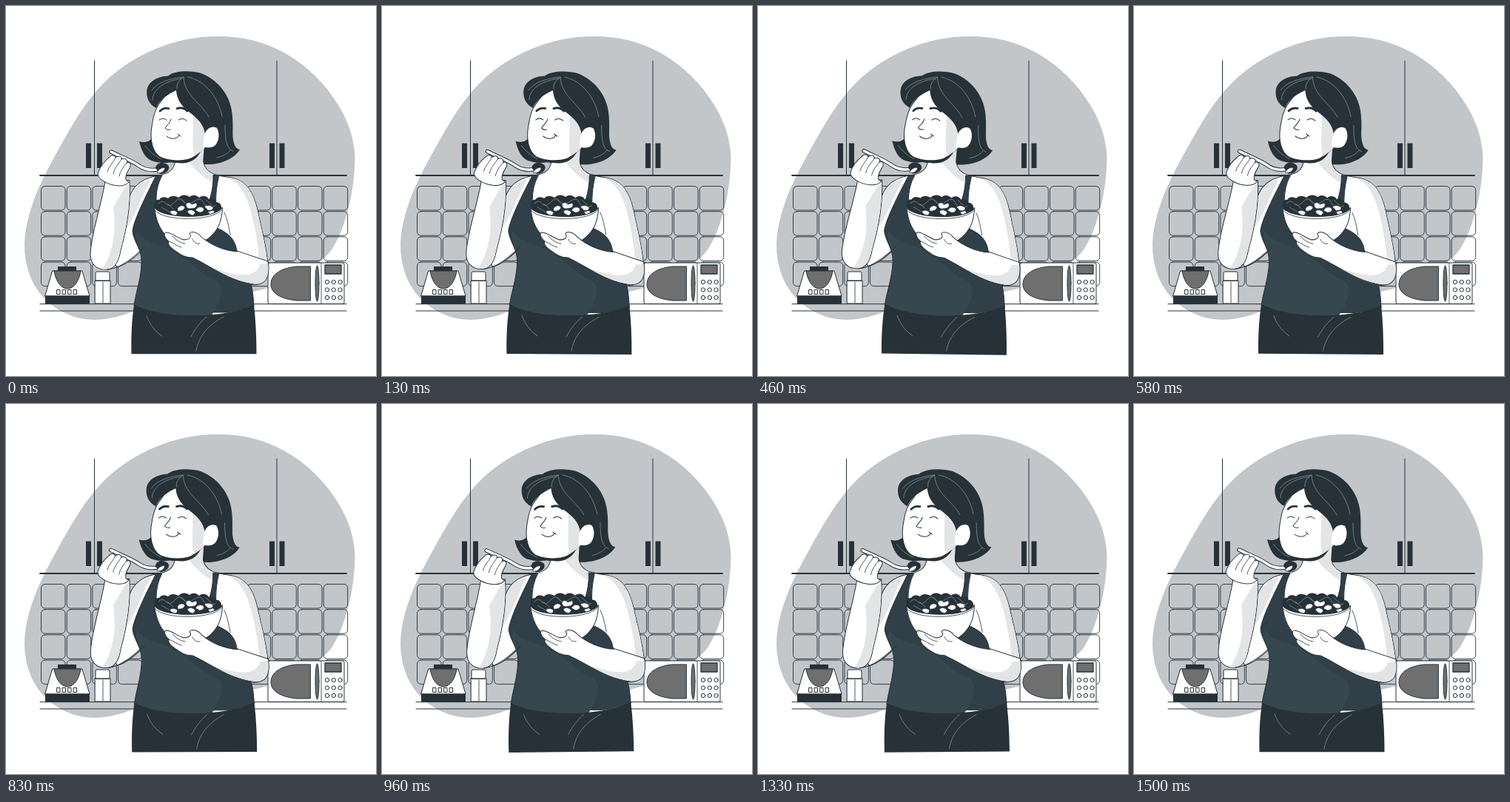
Write an HTML page that moves like this. It is 500 px wide and 500 px high and loops after 1540 ms.

```html
<!DOCTYPE html>
<html lang="en">
<head>
<meta charset="utf-8">
<title>Healthy meal</title>
<style>
html, body { margin: 0; height: 100%; overflow: hidden; background: #fff }
svg { display: block; width: 100vw; height: 100vh; stroke-linecap: round; stroke-linejoin: round }
.line { fill: none; stroke: #263238 }
.skin { fill: #fff; stroke: #263238 }
.dark { fill: #263238 }
.top { fill: #314048; stroke: #263238 }
.shade { fill: #e3e4e5 }
.grey { fill: #6f6f70; stroke: #263238 }
.strand { fill: none; stroke: #87908f; stroke-width: .8 }
</style>
</head>
<body>
<svg viewBox="0 0 500 500">
  <path fill="#c3c6c9" d="M285 41C345 40 392 66 425 102C455 135 471.500 172 471.500 207C471 250 459 302 439 331C408 366 374 377 330 387C270 400 207 398 175 411C150 422 125 427 100 422C55 411 25 375 25 323C26 281 46 240 61 212C88 163 104 133 133 103C172 65 229 41 285 41Z"/>

  <g id="tiles" class="line" stroke-width=".9"></g>
  <path class="line" d="M119.500 74V229M366 74V229"/>
  <path class="line" stroke-width="1.8" d="M46 229H460"/>
  <path class="dark" d="M108 185.500h7v33.500h-7zM123 185.500h7v33.500h-7zM356 185.500h7v33.500h-7zM369.500 185.500h7v33.500h-7z"/>
  <path class="line" d="M46 402.700H460M46 412H460"/>

  <g id="blender">
    <path class="skin" d="M63 358H103L113 392H53Z"/>
    <path class="grey" d="M65 358H101C99 371 92 382 83 382S67 371 65 358Z"/>
    <path class="dark" d="M70 352H95V358H70ZM53 391.500H113V403H53Z"/>
    <path class="skin" d="M69 383.500h4v6h-4zM76.500 383.500h4v6h-4zM84 383.500h4v6h-4zM91.500 383.500h4v6h-4z"/>
  </g>

  <g id="shaker" class="skin">
    <path d="M120.500 371H141V402H120.500ZM121 371V361Q121 359 123 359H138Q140 359 140 361V371Z"/>
    <path d="M131 373V401" stroke-width=".8"/>
  </g>

  <g id="microwave">
    <rect class="skin" x="354" y="347" width="103" height="55.500" rx="2"/>
    <path class="grey" d="M411 352H393C371 354 358 363 358 376C358 388 371 396 393 398H411Z"/>
    <ellipse class="grey" cx="420.500" cy="375" rx="2.500" ry="24"/>
    <path class="line" stroke-width=".8" d="M426 347V402"/>
    <rect class="grey" x="431" y="350" width="22" height="12" stroke-width="1.300"/>
    <g id="buttons" class="skin"></g>
  </g>

  <g id="woman">
    <path class="dark" d="M199 174C197 182 190 186 180 183C183 196 189 208 200 210C210 213 218 212 223 211L250 214L269 214C290 215 309 206 316 194C309 193 306 184 306 165L270 140Z"/>

    <!-- chest and upper arms -->
    <path class="skin" d="M229 204C229 220 222 226 207 229C188 232 175 239 168 255L142 340L150 353C164 349 176 338 188 326L290 330L340 366L354 350C352 325 345 300 340 276C334 250 324 236 305 232C285 229 267 228 266 205Z"/>
    <path class="shade" d="M247 209C257 205 264 196 268 186L266 213C269 222 275 227 280 229L278 238C262 228 252 218 247 209ZM305 232.500C324 236 334 250 339.500 276C345 300 351.500 325 353.500 350L343 350C341 320 335 290 328 268C322 250 313 237 298 231.500ZM196 234C182 260 174 286 163 300L168 257C173 245 184 236 196 234Z"/>

    <!-- top and skirt -->
    <path class="top" d="M203 229H211C205 240 203 250 203 264V290H279L275 262C279 250 280 240 280 228.500H288C284 245 283 258 284 272L285 300C304 308 310 318 312 331L328 366C333 380 334 390 335 406L300 414H200L173 405C176 384 183 367 183 347C184 329 172 318 171 304C173 290 183 270 189 257Z"/>
    <path fill="#37474f" d="M177 305C187 322 213 321 230 334C250 345 262 362 284 371C297 380 291 400 275 422H220L174 404C178 380 185 365 184 345C183 329 173 320 177 305Z"/>
    <path class="dark" d="M173 403.500C205 422 295 424 335 403.500C337.500 425 338.500 448 338.500 470.300H169.500C169 445 170 425 173 403.500Z"/>
    <path class="strand" d="M190 419C195 432 202 440 211 446M257 466C260 448 271 432 294 420M250 447C255 437 262 428 271 420"/>

    <!-- bowl -->
    <path class="dark" d="M201 275C199 266 202 261 207 262C210 257 216 258 219 260C223 255 230 257 233 259C238 254 244 255 248 258C253 254 258 256 261 259C266 255 272 257 274 261C280 259 284 262 284 265C290 265 292 270 291 276C280 293 214 293 201 275Z"/>
    <path class="strand" d="M206 267Q211 261 216 267T228 265T240 264T254 264T267 266T283 270M210 272L222 279M218 267L226 274M237 262L244 268M270 262L278 269"/>
    <path class="skin" stroke-width=".7" d="M232 273q5-6 10-1q-2 6-10 5zM243 268q4-5 8 0l6-2q3 4-2 7l-7 1q-5-1-5-6zM256 276q4-7 11-3q2 5-5 6zM268 271q6-4 12 1q0 5-7 4zM245 277q6-4 11 2l-3 4q-7-1-8-6zM221 278q6-4 11 1l-2 4q-6 0-9-5zM273 278l7-2l2 3l-6 3z"/>
    <path class="skin" d="M200.500 272C208 288 284 289 292.500 272C292 293 285 306 271 316H223C209 306 203 292 200.500 272Z"/>
    <path class="line" stroke-width=".8" d="M201 276C214 292 281 291 292 275"/>

    <!-- arm holding the bowl -->
    <path class="skin" stroke="none" d="M312 331L354 345C357 363 352 376 334 377L300 365Z"/>
    <path class="skin" d="M354 346C357 365 352 377 336 376C302 372 276 351 252 340C242 340 236 336 229 331C222 326 218 322 220 318C214 313 212 306 217 306C225 307 231 313 240 316C247 316 252 312 248 308C249 303 260 306 264 312C277 323 295 331 313 332"/>
    <path class="shade" d="M343 349L354 348C356 365 351 376 336 375.500C316 373 298 365 280 354C306 363 337 371 343 349Z"/>
    <path class="line" stroke-width=".8" d="M220 318C227 320 231 325 237 326M225 311C230 317 236 320 242 321M252 315C254 320 258 322 262 321M295 279C299 287 301 298 303 309"/>

    <!-- arm with the fork -->
    <path class="skin" d="M134 237C129 268 115 309 114 335C114 351 125 357 137 356C148 355 153 343 155 330C162 305 169 272 167 236Z"/>
    <path class="shade" d="M160 246L166.500 240C168 275 161 305 154 332C151 349 144 357 130 355.500C144 335 150 305 145 272Z"/>
    <path class="line" d="M137 356C155 355 173 339 187 326"/>
    <path class="line" stroke-width="5.500" d="M142 197C156 204 170 209 180 216Q190 223 204 221"/>
    <path fill="none" stroke="#fff" stroke-width="3.500" d="M142 197C156 204 170 209 180 216Q190 223 204 221"/>
    <path class="dark" d="M202 219C203 211 213 210 219 215C223 220 217 227 208 227Z"/>
    <path class="skin" stroke-width=".7" d="M205 223Q211 217 215 219Q213 226 205 226Z"/>
    <path class="skin" d="M134 238C129 235 122 231 125 224C128 216 133 210 139 205C142 201 147 201 148 205C152 202 157 203 156 207C161 205 165 208 163 212C168 210 170 214 167 219C164 224 161 229 162 235L166 238C160 246 143 243 134 238Z"/>
    <path class="line" stroke-width=".8" d="M148 205C145 212 139 216 137 224M156 207C152 214 146 219 145 227M163 212C158 218 154 224 153 230"/>

    <!-- head -->
    <path class="skin" d="M206 134C199 145 199 153 197 163C194 181 198 197 208 204C220 211 239 211 250 206C259 201 266 195 269 190L252 112L225 108Z"/>
    <path class="shade" d="M251 140C256 160 249 188 255 203C262 199 267 194 270 190L270 160Z"/>
    <path class="dark" d="M201 199C212 209 237 211 252 205L263 197C257 209 245 214 232 212C216 212 207 208 201 199Z"/>
    <path class="dark" d="M203 138C194 133 189 125 190.500 113C193 101 206 95 219 94.500C228 87 251 87 264 91C289 101 305 124 306 150C307 162 306 177 306 182L287 188L269 174C268 160 258 151 247 143C236 134 231 126 230 114C219 119 207 127 203 138Z"/>
    <path fill="#fff" d="M268 174C271 165 279 161 285 165C289 172 288 182 283 188C279 192 273 192 266 190Z"/>
    <path class="strand" d="M198 127C198 112 215 101 238 98M197 114C204 103 222 98 239 96M231 112C230 105 234 100 240 96M240 96C241 121 263 130 274 150M246 96C270 101 287 124 292 149M296 161C296 184 299 194 307 196M285 205C294 203 300 199 303 195M188 189C194 197 203 204 210 207"/>
    <path class="line" stroke-width="2.800" d="M208 142Q213 137 220 138.500M231 138.500Q240 136 245 142"/>
    <path class="line" d="M207 154Q212 150 217 154M233 154Q239 150 244 155M223 153C222 158 217 161 215 165Q217 168 222 167M217 176C223 181 231 180 234 175M232 173L236 176"/>
  </g>
</svg>
<script>
const $ = id => document.getElementById(id);

for (let row = 0; row < 4; row++)
  for (let col = 0; col < 12; col++)
    $('tiles').innerHTML += `<rect x="${47.5 + col * 34.7}" y="${243.5 + row * 34.2}" width="32.5" height="32.5" rx="5"/>`;

for (let i = 0; i < 9; i++)
  $('buttons').innerHTML += `<circle cx="${434 + i % 3 * 8.8}" cy="${373 + (i / 3 | 0) * 10.5}" r="2.700"/>`;

// Sway 1 degree each way over 1.5 s at 24 steps per second, then rest one step.
const LOOP = 1540, PERIOD = 1500, STEP = 1000 / 24;
function sway(time) {
  const step = Math.floor((time % LOOP + 5) / STEP);
  const phase = Math.min(step * STEP / PERIOD, 1);
  return phase < .25 ? 4 * phase : phase < .75 ? 2 - 4 * phase : 4 * phase - 4;
}

let start;
function draw(now) {
  start ??= now;
  $('woman').setAttribute('transform', `rotate(${sway(now - start)} 235 281)`);
  requestAnimationFrame(draw);
}
requestAnimationFrame(draw);
</script>
</body>
</html>
```
